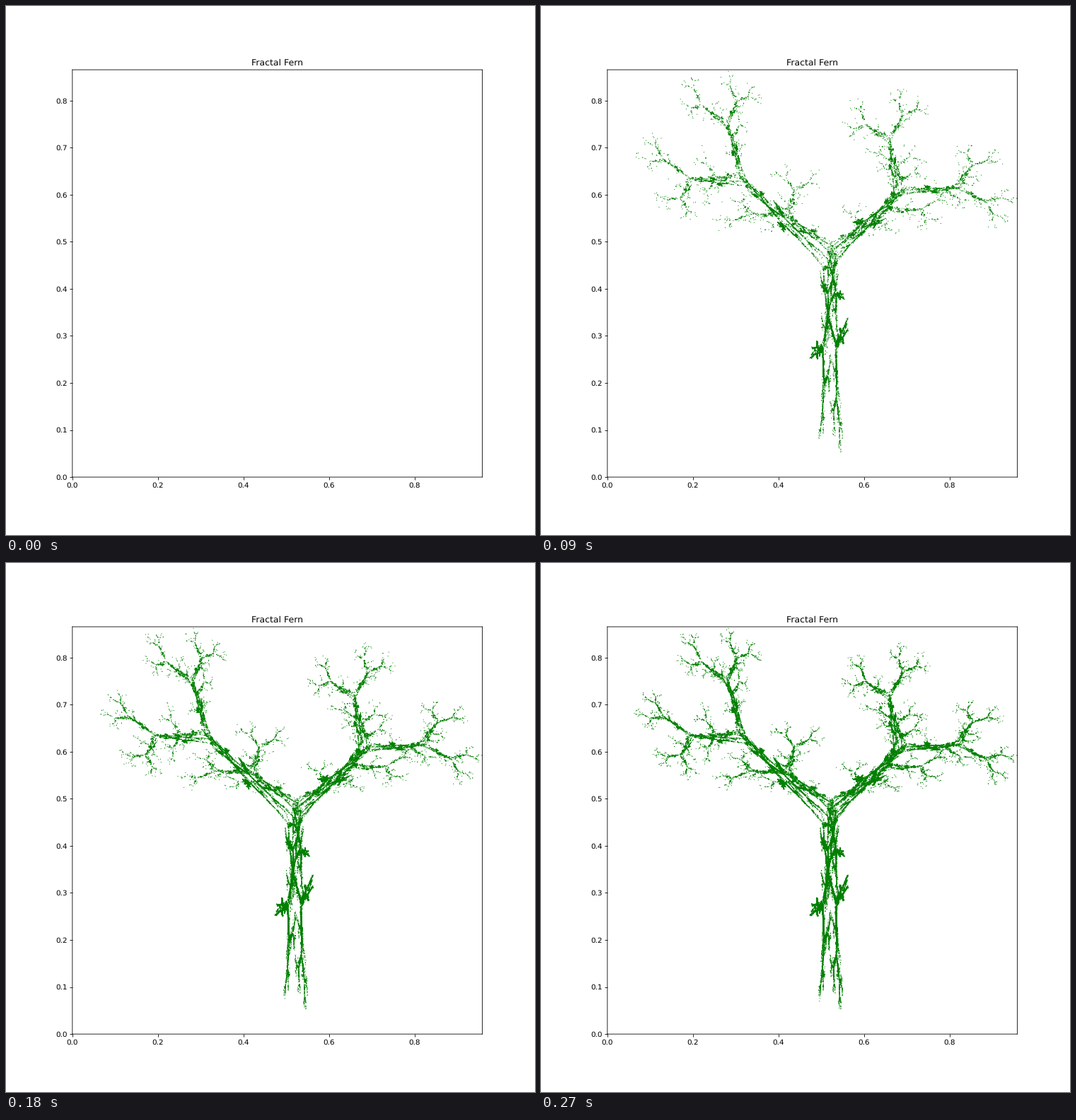
Recreate the animation shown at these times as a matplotlib script. Size 748 by 748 pixels, loop 300 ms.

```python
import random

import numpy as np
import matplotlib.pyplot as plt
from matplotlib.animation import FuncAnimation

FRAMES, INTERVAL = 10, 30
STEP = 10000  # points added per frame


def left_bough(x, y):
    return 0.195 * x - 0.488 * y + 0.4431, 0.344 * x + 0.443 * y + 0.2452


def right_bough(x, y):
    return 0.462 * x + 0.414 * y + 0.2511, 0.361 * y - 0.252 * x + 0.5692


def right_root(x, y):
    return 0.5976 - 0.058 * x - 0.07 * y, 0.453 * x - 0.111 * y + 0.0969


def left_root(x, y):
    return 0.4884 - 0.035 * x + 0.07 * y, 0.022 * y - 0.469 * x + 0.5069


def crown(x, y):
    return 0.8562 - 0.637 * x, 0.501 * y + 0.2513


def chaos_game(count):
    """Walk from the origin, applying an equally likely map at each step."""
    rng = random.Random(7)
    maps = [left_bough, right_bough, right_root, left_root, crown]
    walk = [(0, 0), left_root(*right_bough(0, 0))]
    while len(walk) < count:
        walk.append(rng.choice(maps)(*walk[-1]))
    return np.array(walk)


points = chaos_game(FRAMES * STEP)

plt.rcParams.update({"font.family": "DejaVu Sans", "text.hinting": "none"})
fig, ax = plt.subplots(figsize=(10, 10), dpi=74.8)
fig.subplots_adjust(left=0.1255, right=0.9005, bottom=0.1095, top=0.8795)
ax.set_xlim(0, 0.958)
ax.set_ylim(0, 0.8655)
ax.set_title("Fractal Fern")
for spine in ax.spines.values():
    spine.set_snap(False)

# Two equal sizes keep the dots at their sub-pixel positions.
dots = ax.scatter([0, 0], [0, 0], s=[0.93, 0.93], marker="s", color="green",
                  linewidths=0, snap=False)


def update(frame):
    dots.set_offsets(points[:frame * STEP])
    return dots,


anim = FuncAnimation(fig, update, frames=FRAMES, interval=INTERVAL,
                     repeat=True, repeat_delay=0)
plt.show()
```
